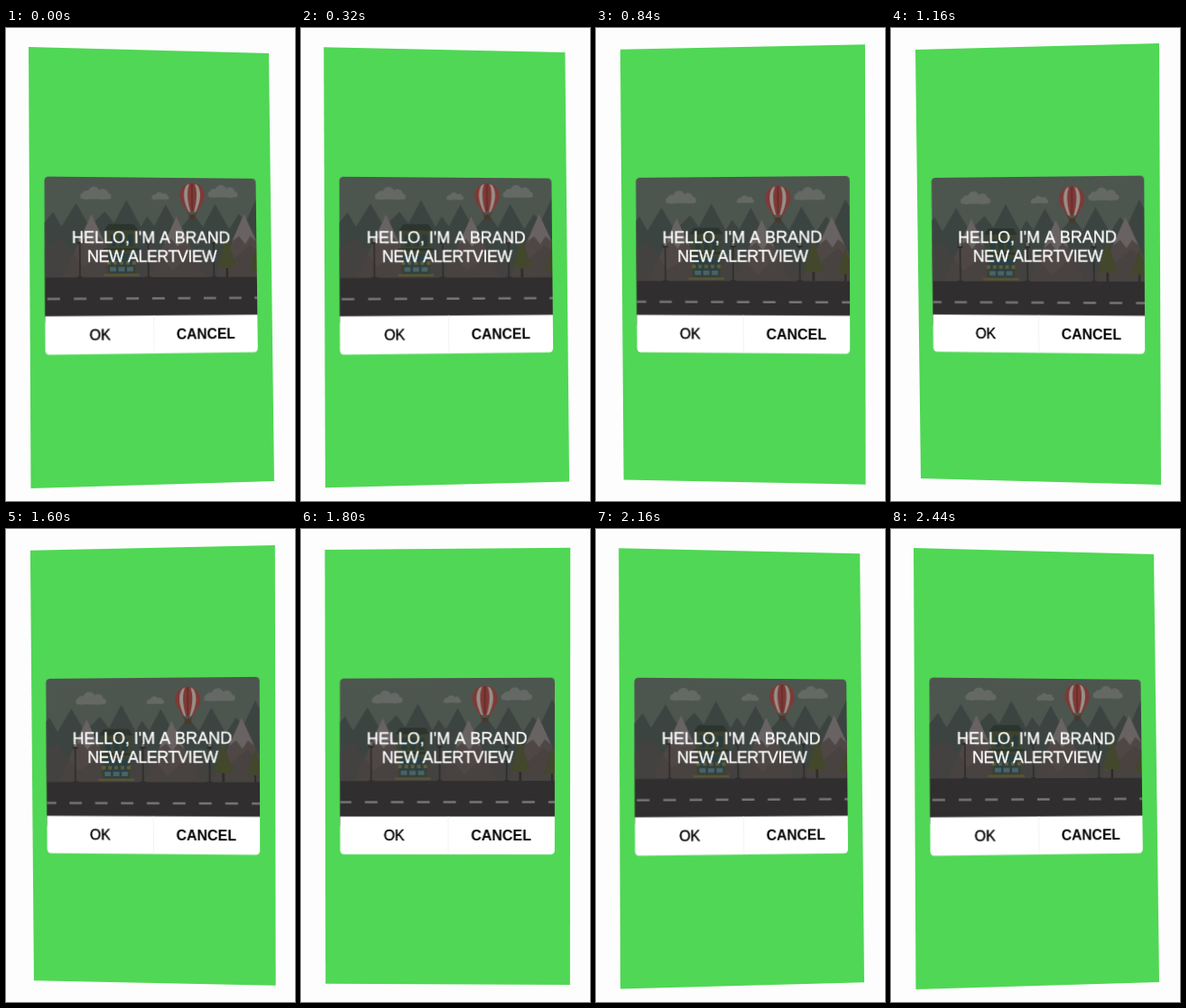
An HTML page that plays this animation: 320x524 px, repeating every 2.48 s.

```html
<!DOCTYPE html>
<html lang="en">
<head>
<meta charset="utf-8">
<title>Alert view tilt</title>
<style>
  html, body { margin: 0; width: 100%; height: 100%; overflow: hidden; background: #fdfdfd; }
  #plane { position: absolute; left: 0; top: 0; width: 271px; height: 483px; transform-origin: 0 0; }
  text { font-family: "Liberation Sans", Arial, Helvetica, sans-serif; font-size: 16px; text-anchor: middle; font-kerning: none; }
  .title { font-size: 18px; fill: #fff; stroke: #fff; stroke-width: .35px; }
  .ok { stroke: #000; stroke-width: .4px; }
</style>
</head>
<body>
<svg id="plane" viewBox="26 22.5 271 483">
  <defs>
    <clipPath id="card"><rect x="42.5" y="165.5" width="237.5" height="195.5" rx="4.5"/></clipPath>
    <g id="cloud" fill="#646965">
      <circle cx="-10" cy="-4" r="5"/><circle cx="-2" cy="-7" r="6.5"/><circle cx="8" cy="-5" r="6"/>
      <rect x="-17" y="-6" width="34" height="6.5" rx="3.2"/>
    </g>
    <g id="peak">
      <path d="M-32 70L0 0L32 70z" fill="#4f4746"/>
      <path d="M0 0L14 31L7 25L1 34L-6 25L-14 31z" fill="#686362"/>
    </g>
    <g id="lamp" stroke="#2b2a2b" fill="#777468">
      <path d="M0 278V239M-3 278H3M-3 240H3" stroke-width="1.5"/>
      <rect x="-2" y="234" width="4" height="5" stroke-width=".8"/>
    </g>
    <g id="tree" fill="#43472c">
      <path d="M0 278V262" stroke="#2f2a25" stroke-width="2.5"/>
      <path d="M0 232L11 268H-11z"/>
    </g>
  </defs>

  <rect x="26" y="22.5" width="271" height="483" fill="#50d755"/>

  <g clip-path="url(#card)">
    <g id="scene">
      <rect x="30" y="155" width="262" height="170" fill="#4d554f"/>
      <use href="#cloud" x="97" y="191"/>
      <use href="#cloud" transform="translate(169 191) scale(.58)"/>
      <use href="#cloud" x="240" y="188"/>
      <path fill="#3b4441" d="M30 278V230L50 206L59 222L75 196L90 222L107 205L117 218L131 192L147 222L154 210L162 221L175 197L190 225L206 207L217 222L231 196L247 224L258 207L266 216L279 188L292 212V278z"/>
      <use href="#peak" x="92" y="208"/>
      <use href="#peak" x="187" y="210"/>
      <use href="#peak" x="264" y="207"/>
      <path fill="#474140" d="M30 278V254L59 234L82 266L110 247L132 269L157 240L182 271L212 244L237 270L270 242L292 260V278z" opacity=".8"/>
      <use href="#tree" x="244"/>
      <use href="#tree" transform="translate(279 56) scale(.8)"/>

      <g>
        <rect x="109" y="222" width="32" height="54" fill="#3d432f"/>
        <path d="M106 226L111 219H139L144 226z" fill="#2b342d"/>
        <path d="M105 247H145" stroke="#2b342d" stroke-width="2.5"/>
        <path d="M113 237H138" stroke="#283b3d" stroke-width="13" stroke-dasharray="6 3.5"/>
        <rect x="111" y="252" width="28" height="21" fill="#2b4043"/>
        <path d="M109 262H141" stroke="#615c36" stroke-width="4" stroke-dasharray="4 3"/>
        <path d="M112 269H138" stroke="#4c6265" stroke-width="5" stroke-dasharray="7 2.5"/>
        <path d="M105 275.5H145" stroke="#5a5535" stroke-width="2.5"/>
      </g>
      <use href="#lamp" x="79"/>
      <use href="#lamp" x="155"/>
      <use href="#lamp" x="229"/>

      <g>
        <path d="M199 203L202 209M211 203L208 209" stroke="#40302a" stroke-width=".8"/>
        <path d="M191 187C191 168 219 168 219 187C219 194 213 199 211 205H199C197 199 191 194 191 187z" fill="#7e3936"/>
        <path d="M199 175C194 182 195 193 201 205H203C199 191 199 181 202 173.500z
                 M208 173.500C211 181 211 191 207 205H209C215 193 216 182 211 175z" fill="#969089"/>
        <path d="M205 173V204" stroke="#672a28" stroke-width="1.500"/>
        <rect x="201.500" y="208" width="7" height="5.500" rx="1" fill="#4a382a"/>
      </g>

      <rect x="30" y="278" width="262" height="50" fill="#302e2f"/>
      <path d="M14 301.500H292" stroke="#777575" stroke-width="2.500" stroke-dasharray="14 15"/>
    </g>

    <rect x="42" y="319" width="239" height="43" fill="#fff"/>
    <path d="M162.500 319V361" stroke="#f3f3f3"/>
  </g>

  <text class="title" x="161" y="238.500">HELLO, I'M A BRAND</text>
  <text class="title" x="161.500" y="260" letter-spacing="-.45">NEW ALERTVIEW</text>
  <text class="ok" x="102.500" y="346">OK</text>
  <text x="221" y="346" font-weight="bold">CANCEL</text>
</svg>
<script>
  const LOOP = 2480, TURN = 1230, MID = 0.3, W = 271, H = 483;
  // Corners clockwise from top left: x, y pairs at progress 0, MID and 1.
  const poses = [
    [25, 21, 291, 28, 297, 502, 27.5, 510],
    [25.8, 22, 296, 24.2, 297.3, 503.7, 26, 507],
    [27, 24, 297, 17, 299, 506, 33, 499]
  ];
  const plane = document.getElementById('plane');
  const scene = document.getElementById('scene');

  const ease = t => t < 0.5 ? 4 * t ** 3 : 1 - 4 * (1 - t) ** 3;

  // Quadratic through the three poses.
  function corners(p) {
    const k0 = (p - MID) * (p - 1) / MID;
    const k1 = p * (p - 1) / (MID * (MID - 1));
    const k2 = p * (p - MID) / (1 - MID);
    return poses[0].map((v, i) => v * k0 + poses[1][i] * k1 + poses[2][i] * k2);
  }

  // Projective transform from the W x H rectangle to a quad.
  function project([x0, y0, x1, y1, x2, y2, x3, y3]) {
    const sx = x0 - x1 + x2 - x3, sy = y0 - y1 + y2 - y3;
    const ax = x1 - x2, ay = y1 - y2, bx = x3 - x2, by = y3 - y2;
    const den = ax * by - bx * ay;
    const g = (sx * by - bx * sy) / den, h = (ax * sy - sx * ay) / den;
    const m = [
      (x1 - x0 + g * x1) / W, (y1 - y0 + g * y1) / W, 0, g / W,
      (x3 - x0 + h * x3) / H, (y3 - y0 + h * y3) / H, 0, h / H,
      0, 0, 1, 0,
      x0, y0, 0, 1
    ];
    return `matrix3d(${m.map(v => v.toFixed(9))})`;
  }

  const start = performance.now();
  function draw(now) {
    const t = Math.max(0, now - start) % LOOP;
    const p = ease(Math.max(0, 1 - Math.abs(t - TURN) / TURN));
    plane.style.transform = project(corners(p));
    // The scenery drifts behind the card opening.
    scene.setAttribute('transform', `translate(${(MID - p) * 6.5} ${(p - MID) * 5})`);
    requestAnimationFrame(draw);
  }
  draw(start);
</script>
</body>
</html>
```
